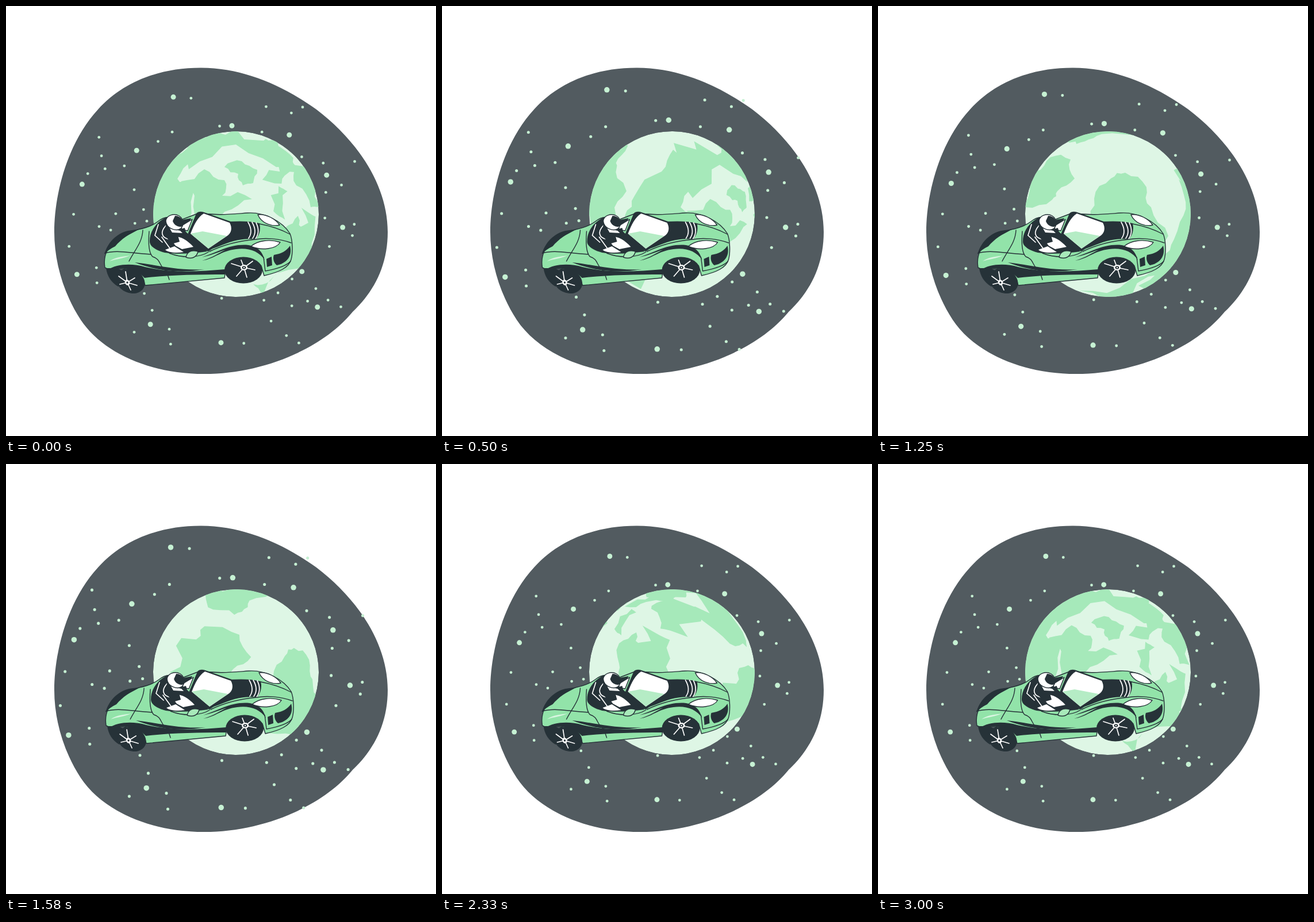
These frames come from a looping animation (748x748 px, 3.04 s). An HTML page:

```html
<!DOCTYPE html>
<html lang="en">
<head>
<meta charset="utf-8">
<title>Space drive</title>
<style>
  html, body { margin: 0; width: 100%; height: 100%; overflow: hidden; background: #fff; }
  svg { display: block; width: 100vw; height: 100vh; }
  .dark { fill: #263238; }
  .green { fill: #92e3a9; }
  .white { fill: #fff; }
  .ink { stroke: #263238; stroke-width: 1.4; stroke-linejoin: round; stroke-linecap: round; }
  .line { fill: none; }
  .spokes { fill: none; stroke: #fff; stroke-width: 1.7; stroke-linecap: round; }
</style>
</head>
<body>
<svg viewBox="0 0 748 748">
  <defs>
    <clipPath id="disc"><circle r="144"/></clipPath>
  </defs>

  <path fill="#525b60" d="M338 107.5C410 107 480 137 540 180C612 235 664 312 664 393C664 452 640 497 603 532C550 597 445 640 345 640C250 640 168 603 130 546C100 500 84 445 84 393C84 330 105 240 160 180C205 130 270 107.5 338 107.5Z"/>
  <g id="stars" fill="#c6f1d3"></g>

  <g transform="translate(400 362) rotate(23)" clip-path="url(#disc)">
    <circle fill="#def6e5" r="144"/>
    <path fill="#a6e9ba" id="land"/>
  </g>

  <g id="car">
    <!-- body -->
    <path class="green ink" d="M172 455C169 436 175 421 190 410L229 389C244 386 255 382 264 375C275 366 290 364 302 373L336 360C368 365 392 362 420 360C450 358 481 375 494 396C499 408 499 430 496 441C492 455 476 463 449 469L444 452C430 434 395 435 382 459L380 473L242 486C236 462 202 452 180 459Z"/>
    <path class="dark" d="M171 432C177 411 192 396 212 391L233 388C214 396 200 406 190 418C182 422 176 426 171 432Z"/>
    <path class="ink line" d="M172 430C192 424 210 429 252 432M238 390C237 411 225 423 214 444M249 392C247 416 249 430 255 436C270 440 266 454 279 461L284 476M284 430C310 440 338 437 352 428"/>
    <path fill="#fff" opacity=".65" d="M180 444C192 436 204 436 216 434C202 440 192 440 180 444Z"/>
    <path class="dark" d="M177 459C192 449 218 447 242 454C294 466 340 461 381 458L381 467C330 467 282 468 241 473C228 458 202 453 177 459Z"/>
    <path class="dark" d="M224 446C262 450 298 461 345 458C300 466 260 460 224 446Z"/>

    <!-- cockpit -->
    <path class="dark" d="M250 411C249 394 260 376 280 367L302 373L322 369L312 392L350 427C324 431 296 432 276 429C260 425 251 418 250 411Z"/>
    <path class="white ink" d="M306 382L324 371L316 391L305 389Z"/>
    <path class="white" d="M285 404C294 397 311 402 326 419L306 423L295 417ZM277 424C282 429 296 430 309 428L293 418Z"/>
    <path class="spokes" d="M265 380L259 399L272 411M278 382C268 393 270 403 284 406M271 402L289 427M279 396L298 401"/>
    <path class="dark" d="M278 380L296 390L311 386L313 395L299 399L302 410L288 414L276 398Z"/>
    <path class="white" d="M285 387L303 391L307 395L289 394Z"/>
    <path class="white ink" d="M278 374C279 364 292 360 301 365C309 370 310 381 304 387C296 393 279 387 278 374Z"/>
    <path class="dark" d="M294 365C304 365 310 373 308 382C303 387 292 382 290 374Z"/>

    <!-- hood and windscreen -->
    <path class="dark" d="M386 375C408 374 426 374 441 378C444 390 440 400 434 406C413 403 393 408 368 419L354 424L389 398Z"/>
    <path class="spokes" d="M421 376C428 388 427 397 422 404M428 376C435 388 434 397 429 404M435 377C441 389 439 398 434 405"/>
    <path class="dark" d="M331 361C334 357 340 357 345 359L391 375C395 386 395 397 388 402L352 427L347 425L316 397Z"/>
    <path class="white" d="M344 361L389 377C394 386 392 394 386 399L352 422L321 396C327 380 334 367 344 361Z"/>
    <path fill="#b5ecc5" d="M321 396L342 392L384 400L352 422Z"/>
    <path class="ink" fill="#a8e9ba" d="M313 437C315 427 323 424 334 427C332 437 323 441 313 437Z"/>
    <path class="dark" d="M341 437C370 428 390 413 422 416C441 419 447 431 450 442C440 426 421 420 400 423C374 426 362 440 341 443C361 437 369 430 382 424C367 429 355 434 341 437Z"/>
    <path class="ink line" d="M354 427C381 414 410 408 434 406C450 403 474 404 496 412M441 379C463 383 481 390 494 397"/>

    <!-- nose -->
    <path class="white ink" d="M438 363C453 361 469 371 476 381C463 384 445 379 438 363Z"/>
    <path class="white ink" d="M426 418C438 408 458 405 477 411C470 423 444 426 426 418Z"/>
    <path class="dark" d="M466 433C479 431 488 426 494 417C499 436 487 448 471 451C465 446 464 438 466 433ZM453 440L462 436L463 451L454 454Z"/>
    <path class="ink line" d="M448 437L451 461C473 457 488 452 495 444"/>

    <!-- wheels -->
    <path class="dark" d="M174 456C176 470 183 481 195 488L216 468L194 456Z"/>
    <ellipse class="dark" cx="216.5" cy="478.5" rx="26" ry="20.5" transform="rotate(25 216.5 478.5)"/>
    <ellipse class="dark" cx="413" cy="459.5" rx="33" ry="23"/>
    <path class="spokes" d="M211 481L196 470M211 481L208 462M211 481L224 473M211 481L228 486M211 481L217 494M211 481L198 484M414 455L392 448M414 455L409 442M414 455L429 444M414 455L433 459M414 455L419 472M414 455L401 470"/>
    <ellipse class="white" cx="211" cy="481" rx="4" ry="5" transform="rotate(-25 211 481)"/>
    <circle class="dark" cx="211" cy="481" r="1.7"/>
    <ellipse class="white" cx="414" cy="455" rx="6" ry="5"/>
    <ellipse class="dark" cx="414" cy="455" rx="3.3" ry="2.7"/>
    <circle class="white" cx="414" cy="455" r="1.2"/>
  </g>
</svg>

<script>
const LOOP = 3040, FRAMES = 73, R = 144, GLOBE = [400, 362];
const ROLL = 23 * Math.PI / 180, COS = Math.cos(ROLL), SIN = Math.sin(ROLL);
const $ = id => document.getElementById(id);
const points = text => text.split(' ').map(p => p.split(',').map(Number));
const distance = (a, b) => Math.hypot(a[0] - b[0], a[1] - b[1]);

let seed = 11;
function random() {
  seed = (seed * 16807) % 2147483647;
  return seed / 2147483647;
}

// A dozen bright stars, then small ones scattered in the gaps around the globe
function scatterStars(count) {
  const bright = points('291,158 393,208 493,224 227,251 558,294 132,310 586,385 123,467 515,462 542,524 251,554 374,586');
  const all = [...bright];
  for (let tries = 0; all.length < bright.length + count && tries < 5000; tries++) {
    const angle = random() * 2 * Math.PI, reach = Math.sqrt(random());
    const star = [370 + 264 * reach * Math.cos(angle), 380 + 250 * reach * Math.sin(angle)];
    if (distance(star, GLOBE) > R + 4 && all.every(s => distance(s, star) > 19)) all.push(star);
  }
  return all.map(([x, y], i) =>
    `<circle cx="${x}" cy="${y}" r="${i < bright.length ? 4.5 : 2.4}"/>`).join('');
}
$('stars').innerHTML = scatterStars(55);

// Each pass pushes the middle of every coast segment in or out.
function roughen(outline, passes) {
  if (!passes) return outline;
  const rough = outline.flatMap(([x, y], i) => {
    const [nx, ny] = outline[(i + 1) % outline.length], push = (random() - 0.5) * 0.36;
    return [[x, y], [(x + nx) / 2 - (ny - y) * push, (y + ny) / 2 + (nx - x) * push]];
  });
  return roughen(rough, passes - 1);
}

// Places a stage point on the sphere at the step when it is seen there.
function toSphere([px, py], step) {
  const dx = px - GLOBE[0], dy = py - GLOBE[1];
  const x = dx * COS + dy * SIN, y = dy * COS - dx * SIN;
  const z = Math.sqrt(Math.max(0, R * R - x * x - y * y));
  return { y, ring: Math.hypot(x, z), lon: Math.atan2(x, z) - step * 2 * Math.PI / FRAMES };
}

const land = (step, corners) => roughen(points(corners), 2).map(p => toSphere(p, step));

const lands = [
  land(0, '318,284 330,238 400,219 470,235 520,282 543,350 530,350 505,312 498,278 400,241'),
  land(0, '304,305 345,284 380,303 376,330 428,336 380,358 345,372 325,405 328,330'),
  land(0, '380,280 410,270 437,285 430,308 412,312 404,292'),
  land(0, '430,484 460,478 498,438 530,424 512,453 446,500'),
  land(12, '318,365 335,330 382,288 402,250 432,272 430,312 415,350 455,360 440,430 320,430'),
  land(30, '256,350 275,290 300,263 335,267 342,300 312,322 303,337'),
  land(30, '378,378 376,335 405,300 430,290 467,315 475,350 505,400 480,440 390,440'),
  land(30, '350,495 440,475 527,430 510,455 440,502'),
  land(45, '368,226 430,219 468,238 470,270 458,288 405,272'),
  land(45, '256,355 275,290 297,259 307,268 290,325'),
  land(56, '318,248 365,229 425,220 424,232 355,240'),
  land(56, '300,287 330,252 338,258 312,298'),
  land(56, '308,312 338,293 345,320 330,357 310,360')
];

// Hidden points slide along the rim; a wholly hidden land is left out.
function landPath(shape, n) {
  const turn = n * 2 * Math.PI / FRAMES;
  let seen = false;
  const spots = shape.map(({ y, ring, lon }) => {
    const x = ring * Math.sin(lon + turn), front = ring * Math.cos(lon + turn);
    if (front > 0) seen = true;
    const k = front < R * 0.13 ? R * 1.03 / Math.hypot(x, y) : 1;
    return (x * k).toFixed(1) + ' ' + (y * k).toFixed(1);
  });
  return seen ? 'M' + spots.join('L') + 'Z' : '';
}

// Eased value between [step, value] pairs
function ease(keys, n) {
  const i = Math.max(1, keys.findIndex(k => k[0] >= n));
  const [a, u] = keys[i - 1], [b, v] = keys[i];
  return u + (v - u) * (1 - Math.cos(Math.PI * (n - a) / (b - a))) / 2;
}

const pulse = [[-1, 0], [4, 0.1], [24, 0], [27, 0], [35, 0.1], [43, 0], [FRAMES, 0]];
const sway = [[0, 0], [12, 2.5], [20, -4], [30, 2], [56, 2.5], [72, 0]];

function draw() {
  const time = performance.now() % LOOP;
  const n = Math.min(FRAMES - 1, Math.floor((time + 5) * 24 / 1000));
  const scale = 0.989 * (1 + ease(pulse, n));
  $('stars').setAttribute('transform', `translate(369 385) scale(${scale}) translate(-369 -385)`);
  $('car').setAttribute('transform', `translate(${ease(sway, n)} 0)`);
  $('land').setAttribute('d', lands.map(shape => landPath(shape, n)).join(''));
  requestAnimationFrame(draw);
}
draw();
</script>
</body>
</html>
```
